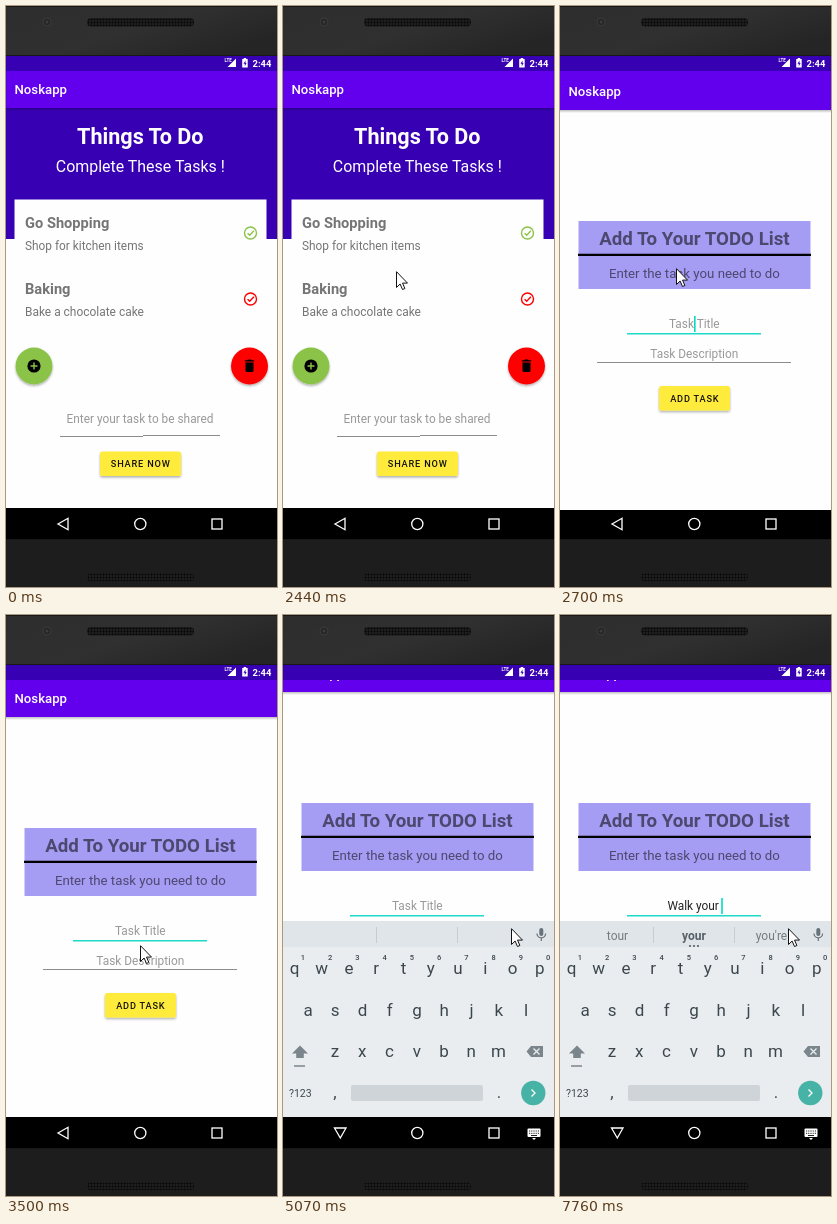
Recreate the animation shown at these times as an HTML page. Size 271 by 581 pixels, loop 8 s.

```html
<!DOCTYPE html>
<html lang="en">
<head>
<meta charset="utf-8">
<title>Task list demo</title>
<style>
html, body { margin: 0; width: 100%; height: 100%; overflow: hidden; background: #1d1d1d; }
svg { display: block; width: 271px; height: 581px; font: 11.87px Roboto, sans-serif; }
text { white-space: pre; }
.mid { text-anchor: middle; }
.b { font-weight: 700; }
.btn { font-size: 9.2px; font-weight: 500; letter-spacing: .82px; fill: #111; }
.hint { fill: #999; }
.icon { fill: none; stroke: #fff; stroke-width: 1.3; }
.ink { fill: #3c474d; }

.list, .form, .keys, .mouse, .ripple, .back, .down { animation: 8s -15ms step-end infinite; }
.list { animation-name: list; }
.form { animation-name: form; }
.keys { animation-name: keys; }
.mouse { animation-name: mouse; }
.ripple { animation-name: ripple; transform-origin: 28px 360px; }
.back { animation-name: back; }
.down { animation-name: down; }

@keyframes list { 0% { opacity: 1; } 33.75%, 100% { opacity: 0; } }
@keyframes form {
  0% { opacity: 0; transform: none; }
  32.25% { opacity: .7; transform: translateY(18px); }
  33.75% { opacity: 1; transform: translateY(2px); }
  35.375% { opacity: 1; transform: none; }
  55.375% { opacity: 1; transform: translateY(-18px); }
  57%, 100% { opacity: 1; transform: translateY(-25px); }
}
@keyframes keys {
  0% { opacity: 0; transform: translateY(40px); }
  53.5% { opacity: .6; transform: translateY(31px); }
  55.375% { opacity: .92; transform: translateY(7px); }
  57%, 100% { opacity: 1; transform: none; }
}
@keyframes ripple {
  0% { opacity: 0; transform: scale(.4); }
  20.25% { opacity: .14; transform: scale(.6); }
  21.75% { opacity: .16; transform: none; }
  23.625% { opacity: .12; transform: none; }
  25.125% { opacity: .06; transform: none; }
  27%, 100% { opacity: 0; transform: none; }
}
@keyframes back { 0% { opacity: 1; } 51.625%, 100% { opacity: 0; } }
@keyframes down { 0% { opacity: 0; } 51.625%, 100% { opacity: 1; } }
@keyframes mouse {
  0% { transform: translate(-30px, 399px); }
  6.25% { transform: translate(7px, 399px); }
  7.875% { transform: translate(35px, 381px); }
  9.75% { transform: translate(41px, 376px); }
  11.625% { transform: translate(37px, 373px); }
  13.125% { transform: translate(32px, 371px); }
  27% { transform: translate(49px, 338px); }
  29% { transform: translate(84px, 298px); }
  30.5% { transform: translate(113px, 265px); }
  32.25% { transform: translate(116px, 262px); }
  39.125% { transform: translate(122px, 284px); }
  40.75% { transform: translate(131px, 322px); }
  42.125% { transform: translate(135px, 342px); }
  43.75% { transform: translate(134px, 330px); }
  45.25% { transform: translate(134px, 322px); }
  50.125% { transform: translate(146px, 320px); }
  51.625% { transform: translate(165px, 318px); }
  55.375% { transform: translate(208px, 314px); }
  57%, 100% { transform: translate(228px, 313px); }
}
</style>
</head>
<body>
<svg viewBox="0 0 271 581">
  <defs>
    <linearGradient id="metal" x2="1" y2=".6">
      <stop offset="0" stop-color="#2d2d2d"/><stop offset=".55" stop-color="#303030"/><stop offset="1" stop-color="#252525"/>
    </linearGradient>
    <linearGradient id="fade" x2="0" y2="1">
      <stop offset="0" stop-opacity=".25"/><stop offset="1" stop-opacity="0"/>
    </linearGradient>
    <pattern id="mesh" width="3" height="3" patternUnits="userSpaceOnUse">
      <rect width="3" height="3" fill="#242424"/><circle cx="1.5" cy="1.5" r="1.2" fill="#0a0a0a"/>
    </pattern>
    <filter id="drop" x="-30%" y="-30%" width="160%" height="180%">
      <feDropShadow dx="0" dy="1.5" stdDeviation="1.2" flood-opacity=".32"/>
    </filter>
    <clipPath id="screen"><path d="M0 49H271V533H0z"/></clipPath>
    <g id="bar">
      <path fill="#6200ee" d="M0 49H271V102H0z"/>
      <text x="8.5" y="88" fill="#fff" font-size="13.18" font-weight="500">Noskapp</text>
      <path fill="url(#fade)" d="M0 102H271V105H0z"/>
    </g>
    <g id="tick" fill="none" stroke-width="1.4">
      <circle r="6"/><path d="M-2.9 .2-.8 2.3 3.4-2.2"/>
    </g>
  </defs>

  <g clip-path="url(#screen)">
    <path fill="#fefefe" d="M0 49H271V502H0z"/>
    <path d="M0 502H271V533H0z"/>

    <g class="list">
      <path fill="#3700b3" d="M0 102H271V233H0z"/>
      <path fill="#fefefe" d="M8.5 193.5H260.5V240H8.5z"/>
      <use href="#bar"/>
      <g fill="#fff" class="mid">
        <text x="134.3" y="138" class="b" font-size="21.6">Things To Do</text>
        <text x="134.3" y="166" font-size="15.95">Complete These Tasks !</text>
      </g>
      <g fill="#757575">
        <text x="19" y="222" class="b" font-size="14.65">Go Shopping</text>
        <text x="19" y="244">Shop for kitchen items</text>
        <text x="19" y="288.3" class="b" font-size="14.65">Baking</text>
        <text x="19" y="310.3" font-size="11.95">Bake a chocolate cake</text>
      </g>
      <use href="#tick" x="244.5" y="227" stroke="#8bc34a"/>
      <use href="#tick" x="244.5" y="293" stroke="#f00"/>

      <circle cx="28" cy="360" r="18.5" fill="#8bc34a" filter="url(#drop)"/>
      <circle class="ripple" cx="28" cy="360" r="18.5"/>
      <circle cx="28" cy="360" r="6.6"/>
      <path stroke="#8bc34a" stroke-width="1.4" d="M24.5 360h7M28 356.5v7"/>
      <circle cx="243.5" cy="360" r="18.5" fill="#f00" filter="url(#drop)"/>
      <path d="M238.8 354.2h2.4l.8-.8h3l.8.8h2.4v1.4h-9.4zM239.5 356.4h8v8.3q0 1.3-1.3 1.3h-5.4q-1.3 0-1.3-1.3z"/>

      <text class="mid hint" x="134" y="416.7">Enter your task to be shared</text>
      <path stroke="#8c8c8c" d="M54 430.5H137M137 429.5H214"/>
      <rect x="94" y="445.5" width="81" height="24.5" rx="2.6" fill="#ffeb3b" filter="url(#drop)"/>
      <text class="mid btn" x="134.7" y="461">SHARE NOW</text>
    </g>

    <g class="form">
      <path fill="#fefefe" d="M0 49H271V502H0z"/>
      <use href="#bar"/>
      <path fill="#a59cf3" d="M18.5 213H250.5V281H18.5z"/>
      <path d="M18 245.7H251V248H18z"/>
      <g class="mid" fill="#4d486f">
        <text x="134.4" y="236.5" class="b" font-size="18.7">Add To Your TODO List</text>
        <text x="134.4" y="269.7" font-size="13.28">Enter the task you need to do</text>
      </g>
      <text class="mid hint" id="hint" x="134.3" y="320.3">Task Title</text>
      <text id="typed" y="320.3" fill="#222"><tspan></tspan><tspan text-decoration="underline"></tspan></text>
      <rect id="caret" y="308" width="1.6" height="16" fill="#03dac5"/>
      <path stroke="#1ddbc8" stroke-width="1.6" d="M67 325.8H201"/>
      <text class="mid hint" x="134.3" y="350.3">Task Description</text>
      <path stroke="#8c8c8c" d="M37 354.5H231"/>
      <rect x="99" y="378" width="71" height="24.5" rx="2.6" fill="#ffeb3b" filter="url(#drop)"/>
      <text class="mid btn" x="134.8" y="393.5">ADD TASK</text>
    </g>

    <g class="keys">
      <path fill="#e9edf0" d="M0 306H271V502H0z"/>
      <path fill="#e0e5e9" d="M0 306H271V332H0z"/>
      <path stroke="#c6ccd0" d="M93.5 312V328M174.5 312V328"/>
      <g id="words" class="mid" font-size="12" fill="#737b80">
        <text x="57.5" y="324.8"></text>
        <text x="134" y="324.8" class="b" fill="#566066"></text>
        <text x="211.5" y="324.8"></text>
      </g>
      <g id="dots" fill="#566066">
        <circle cx="130" cy="331" r="1.1"/><circle cx="134" cy="331" r="1.1"/><circle cx="138" cy="331" r="1.1"/>
      </g>
      <rect x="256.3" y="313" width="4" height="8" rx="2" fill="#66737a"/>
      <path d="M254 318.5a4.3 4.3 0 0 0 8.6 0M258.3 323v3" fill="none" stroke="#66737a" stroke-width="1.2"/>
      <g id="letters" class="mid ink"></g>
      <path fill="#7b868c" d="M17 430.5 25 438.5H20.8V443H13.2V438.5H9zM11 450.3H22V451.7H11zM243.5 436.5 248 431H260V442H248z"/>
      <path stroke="#e9edf0" stroke-width="1.3" d="M250.5 433.5l6 6M256.5 433.5l-6 6"/>
      <text class="ink" x="6" y="482" font-size="10.5">?123</text>
      <text class="ink mid" x="52" y="483" font-size="17">,</text>
      <text class="ink mid" x="216" y="483" font-size="17">.</text>
      <rect x="68" y="470" width="132" height="16" rx="2" fill="#cfd4d8"/>
      <circle cx="250.3" cy="478" r="12.2" fill="#47b3a7"/>
      <path class="icon" d="M248.5 474.5 252 478 248.5 481.5"/>
    </g>

    <path fill="#3700b3" d="M0 49H271V65H0z"/>
    <g fill="#fff">
      <text x="246.5" y="61" class="b" font-size="9.4">2:44</text>
      <text x="218.5" y="56" class="b" font-size="4.5">LTE</text>
      <path d="M230 52.5V61H221.5zM236.2 53H237.7V52H240.2V53H241.7V61.5H236.2z"/>
      <path fill="#3700b3" d="M239.5 54.5 237.5 57.7H238.8V60.2L240.6 56.9H239.5z"/>
    </g>
    <g class="icon">
      <path class="back" d="M52 518 62 512.3V523.7z"/>
      <path class="down" d="M51.5 513H63L57.3 523z"/>
      <circle cx="134.3" cy="518" r="5.6"/>
      <rect x="206" y="513" width="10" height="10"/>
    </g>
    <g class="down">
      <rect x="244.5" y="513.5" width="13" height="8.5" rx="1" fill="#fff"/>
      <path stroke="#222" stroke-dasharray="1.2 1" d="M246 516H256M246 518.3H256"/>
      <path stroke="#222" d="M248 520.5H254"/>
      <path fill="#fff" d="M249 523H253L251 525z"/>
    </g>
  </g>

  <path fill="url(#metal)" d="M0 0H271V50H0z"/>
  <path fill="#1d1d1d" d="M0 533H271V581H0z"/>
  <path fill="#181818" d="M0 0H271V1H0zM0 49H271V50H0zM0 533H271V534H0z"/>
  <rect x="81" y="12" width="107" height="8.5" rx="4" fill="url(#mesh)"/>
  <rect x="81" y="567" width="107" height="8.5" rx="4" fill="url(#mesh)"/>
  <circle cx="41" cy="16" r="4" fill="#262626" stroke="#3c3c3c"/>
  <circle cx="41" cy="16" r="1.5" fill="#3c3c3c"/>

  <path class="mouse" d="M.5 .7V16.5L4.1 13 6.5 18.5 8.9 17.5 6.5 12.1H11.5z" fill="#fff" stroke="#111"/>
</svg>
<script>
const $ = id => document.getElementById(id);
const LOOP = 8000, CENTER = 134.6;

const addKey = (s, x, y, size = 17, weight = 400) => {
  const el = document.createElementNS('http://www.w3.org/2000/svg', 'text');
  Object.entries({ x, y, 'font-size': size, 'font-weight': weight }).forEach(a => el.setAttribute(...a));
  el.textContent = s;
  $('letters').append(el);
};
[['qwertyuiop', 11.5, 359.3], ['asdfghjkl', 25, 400.5], ['zxcvbnm', 52, 442]].forEach(([row, x, y], r) =>
  [...row].forEach((key, i) => {
    addKey(key, x + i * 27.25, y);
    if (!r) addKey((i + 1) % 10, x + 8.5 + i * 27.25, 344.5, 7.5, 500);
  }));

// [time, finished text, word being composed]
const typing = [
  [0, '', ''], [5620, '', 'W'], [5770, '', 'Wa'], [5920, '', 'Wal'], [6050, '', 'Walk'], [6290, 'Walk ', ''],
  [6580, 'Walk ', 'y'], [6700, 'Walk ', 'yo'], [6830, 'Walk ', 'you'], [7510, 'Walk ', 'your'], [7760, 'Walk your ', '']
];
// [time, left, middle, right, has more]
const offers = [
  [0, '', '', '', 0], [5770, 'Was', 'W', 'We', 1], [5920, 'Wall', 'Wal', 'Walk', 1], [6170, 'Wall', 'Walk', 'Walking', 1],
  [6440, 'to', 'the', 'in', 0], [6580, 'u', 'y', 'to', 1], [6700, 'to', 'yo', 'so', 1],
  [6980, 'young', 'you', 'your', 1], [7640, 'tour', 'your', "you're", 1]
];
const blinks = [[2580, 3130], [3620, 4130], [4560, 5070], [5500, LOOP]];

const at = (list, t) => list.findLast(step => step[0] <= t);
const show = (el, on) => el.style.opacity = on ? 1 : 0;
const setText = (el, s) => { if (el.textContent !== s) el.textContent = s; };

function draw(t) {
  const typed = $('typed'), [, done, word] = at(typing, t), offer = at(offers, t);
  setText(typed.children[0], done);
  setText(typed.children[1], word);
  const w = done || word ? typed.getComputedTextLength() : 0;
  typed.setAttribute('x', CENTER - w / 2);
  $('caret').setAttribute('x', CENTER + w / 2 - .6);
  show($('hint'), !w);
  show($('caret'), blinks.some(([on, off]) => t >= on && t < off));
  [...$('words').children].forEach((el, i) => setText(el, offer[i + 1]));
  show($('dots'), offer[4]);
}

let start;
function tick(now) {
  start ??= now;
  draw((now - start + 15) % LOOP);
  requestAnimationFrame(tick);
}
requestAnimationFrame(tick);
</script>
</body>
</html>
```
